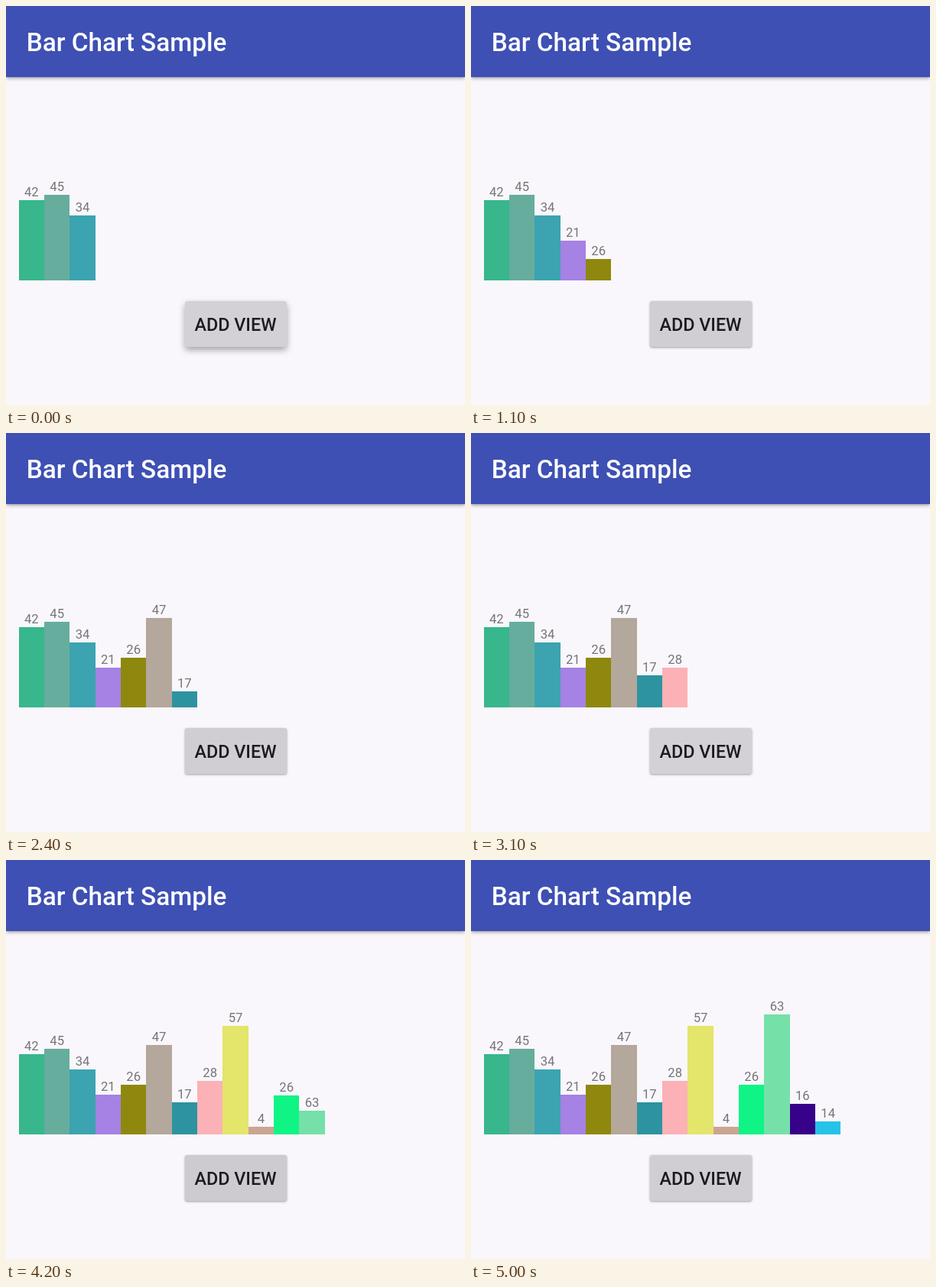
Recreate the animation shown at these times as an HTML page. Size 600 by 522 pixels, loop 5100 ms.

```html
<!DOCTYPE html>
<html lang="en">
<head>
<meta charset="utf-8">
<title>Bar Chart Sample</title>
<style>
  html, body { margin: 0; width: 100%; height: 100%; overflow: hidden; background: #f9f7fb; }
  #stage { position: relative; width: 600px; height: 522px; overflow: hidden; background: #f9f7fb; }
  #header, #button, svg { position: absolute; }
  #header { left: 0; top: 0; width: 600px; height: 92.5px; background: #3e50b4; box-shadow: 0 1px 5px rgba(0, 0, 0, .45); }
  #button { left: 233.5px; top: 386px; width: 133px; height: 60px; border-radius: 3px; }
  svg { left: 0; top: 0; }
  text { font-family: Roboto, sans-serif; }
  .title { font-size: 33.33px; font-weight: 500; fill: #fdfdff; }
  .action { font-size: 23.33px; font-weight: 500; fill: #1b1a1f; text-anchor: middle; }
  .label { font-size: 16.67px; fill: #757477; text-anchor: middle; }
</style>
</head>
<body>
<div id="stage">
  <div id="header"></div>
  <div id="button"></div>
  <svg width="600" height="522" viewBox="0 0 600 522">
    <text class="title" x="26.7" y="59">Bar Chart Sample</text>
    <text class="action" x="300" y="425">ADD VIEW</text>
    <g id="chart"></g>
  </svg>
</div>
<script>
const LOOP = 5100, STEP = 100, GROW = 500;
const DP = 600 / 360, BASE = 359;

// value, colour, time the bar is added
const bars = [
  [42, '#38b68c', -GROW], [45, '#66ad9e', -GROW], [34, '#3ca3b0', -GROW],
  [21, '#a582e3', 123], [26, '#8f880e', 870], [47, '#b4a79b', 1400],
  [17, '#2e93a1', 2150], [28, '#fbb1b5', 2767], [57, '#e4e56b', 3350],
  [4, '#cba594', 3620], [26, '#10f486', 3848], [63, '#76e0a9', 4052],
  [16, '#370189', 4420], [14, '#27c2e8', 4750]
].map(([value, color, start], i) => ({ value, color, start, i }));

const chart = document.getElementById('chart');
const button = document.getElementById('button');
const clamp = v => Math.min(1, Math.max(0, v));
const ease = p => 0.5 - Math.cos(Math.PI * p) / 2;
const edge = i => Math.round((10 + 20 * i) * DP);

function add(name, attrs) {
  const el = document.createElementNS('http://www.w3.org/2000/svg', name);
  for (const key in attrs) el.setAttribute(key, attrs[key]);
  return chart.appendChild(el);
}

for (const bar of bars) {
  const { i, value, color } = bar;
  bar.rect = add('rect', { x: edge(i), width: edge(i + 1) - edge(i), fill: color });
  bar.label = add('text', { class: 'label', x: (20 + 20 * i) * DP });
  bar.label.textContent = value;
}

// Button ripple: quick rise before each tap, slow fade after it
function ripple(t) {
  return Math.max(...bars.slice(3).map(({ start }) => {
    const d = t - start;
    return d < 0 ? clamp(1 + d / 90) : clamp(1 - d / 350);
  }));
}

// Raised shadow while the button is held down
function lift(t) {
  const held = clamp(1 - (t - 123) / 150);
  const press = Math.min(clamp((t - 3200) / 80), clamp(1 - (t - 3350) / 100));
  return Math.max(held, press);
}

function draw(t) {
  for (const { value, start, rect, label } of bars) {
    const h = Math.floor(value * 1.5 * DP * ease(clamp((t - start) / GROW)) + 0.01);
    const shown = t >= start ? 'visible' : 'hidden';
    rect.setAttribute('y', BASE - h);
    rect.setAttribute('height', h);
    label.setAttribute('y', BASE - h - 5);
    rect.style.visibility = label.style.visibility = shown;
  }
  const dark = 10 * ripple(t), up = lift(t);
  button.style.background = `rgb(${[211, 209, 214].map(c => Math.round(c - dark))})`;
  button.style.boxShadow =
    `0 ${1 + 3 * up}px ${3 + 6 * up}px rgba(0, 0, 0, ${0.38 - 0.03 * up})`;
}

const origin = performance.now();
function tick() {
  const t = (performance.now() - origin) % LOOP;
  draw(Math.floor(t / STEP) * STEP);
  requestAnimationFrame(tick);
}
draw(0);
requestAnimationFrame(tick);
</script>
</body>
</html>
```
